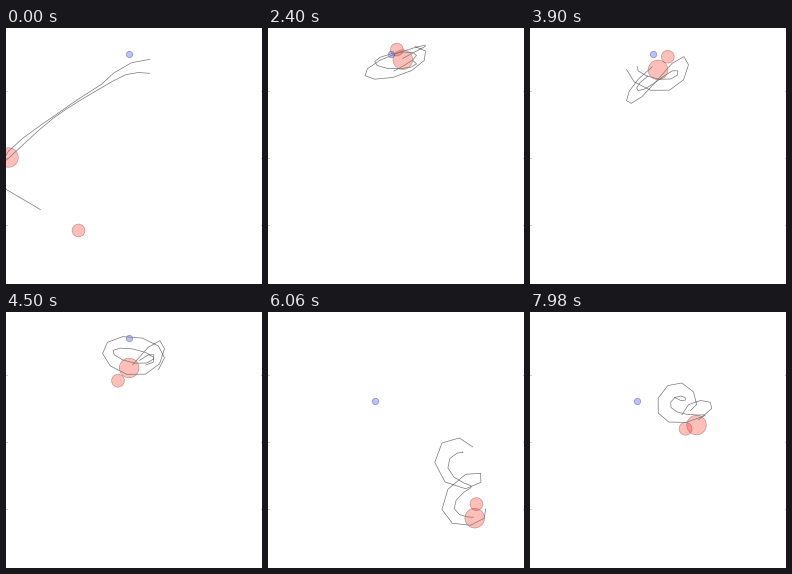
Recreate the animation shown at these times as a matplotlib script. Size 256 by 256 pixels, loop 8000 ms.

```python
import numpy as np
import matplotlib.pyplot as plt
from matplotlib.animation import FuncAnimation
from matplotlib.patches import Circle

SIZE, DPI = 256, 100
FRAMES, STEP = 200, 0.04          # seconds per frame
RESET = 4.89                      # new start and new goal
PLAN = 0.1 * np.arange(1, 16)     # look-ahead times of the planned path
GOALS = (123, 26), (107, 89)


def glide(t, times, values):
    """Smooth curve through key values that never overshoots them."""
    x, y = np.array(times, float), np.array(values, float)
    h, d = np.diff(x), np.diff(y) / np.diff(x)
    same = d[:-1] * d[1:] > 0
    total = np.where(same, d[:-1] + d[1:], 1)
    inner = np.where(same, 2 * d[:-1] * d[1:] / total, 0)
    m = np.concatenate([d[:1], inner, d[-1:]])
    i = np.clip(np.searchsorted(x, t, side="right") - 1, 0, len(h) - 1)
    u = np.clip((t - x[i]) / h[i], 0, 1)
    return ((1 + 2 * u) * (1 - u) ** 2 * y[i] + u * (1 - u) ** 2 * h[i] * m[i]
            + u * u * (3 - 2 * u) * y[i + 1]
            + u * u * (u - 1) * h[i] * m[i + 1])


class Swing:
    """Two bodies swinging about a drifting centre.

    x_turns and y_turns are the times at which each full swing completes.
    Each body has an x and y reach and a lead, in turns, on both axes.
    """

    def __init__(self, centre_x, centre_y, x_turns, y_turns, light, heavy):
        self.centre = centre_x, centre_y
        self.turns = x_turns, y_turns
        self.bodies = light, heavy

    def __call__(self, t):
        mid = [glide(t, *keys) for keys in self.centre]
        phase = [glide(t, k, range(len(k))) for k in self.turns]
        return np.array([
            mid[axis] + reach[axis] * np.cos(2 * np.pi * (phase[axis]
                                                          + lead[axis]))
            for reach, lead in self.bodies for axis in (0, 1)])


def launch(times, light_x, light_y, heavy_x, heavy_y, swing):
    """Run from a starting place into the swing, joined at the last time."""
    join = swing(np.array([times[-1]]))[:, 0]
    keys = [[*k, end] for k, end in
            zip((light_x, light_y, heavy_x, heavy_y), join)]

    def path(t):
        run = np.array([glide(t, times, k) for k in keys])
        return np.where(t < times[-1], run, swing(t))

    return path


hover = Swing(
    centre_x=((1, 7), (127, 127)),
    centre_y=((1.26, 2.42, 3.3, 3.9, 4.4, 5.1, 6.4),
              (54, 39, 29, 43, 55, 43, 46)),
    x_turns=(0.68, 1.68, 2.66, 3.67, 4.9, 5.9, 6.9),
    y_turns=(1.0, 2.0, 3.02, 4.38, 5.15, 6.15, 7.15),
    light=((31, 20), (0, 0)), heavy=((21, 8), (0.05, 0.1)))

climb = Swing(
    centre_x=((5.7, 6.65, 7.1, 7.6, 8.2, 8.8, 9.4),
              (197, 195, 190, 184, 169, 150, 144)),
    centre_y=((5.75, 6.1, 6.45, 7.05, 7.75, 8.4, 9.5),
              (236, 204, 195, 161, 127, 101, 81)),
    x_turns=(5.25, 6.2, 6.92, 7.62, 8.48, 9.37, 10.3),
    y_turns=(5.5, 6.42, 7.1, 7.75, 8.75, 9.5),
    light=((22, 17), (0, 0)), heavy=((10, 5), (0.13, 0.15)))

first = launch((0.02, 0.28, 0.45, 0.84, 1.26),
               (72, -8, -4, 54), (202, 151, 132, 83),
               (2, -10, -3, 49), (129, 139, 134, 88), hover)
second = launch((4.9, 5.1, 5.27, 5.5, 5.75),
                (100, 195, 219, 195), (78, 196, 233, 262),
                (200, 198, 200, 190), (285, 256, 263, 254), climb)

fig = plt.figure(figsize=(SIZE / DPI, SIZE / DPI), dpi=DPI, facecolor="white")
ax = fig.add_axes([0, 0, 1, 1])
ax.set_xlim(-0.5, SIZE - 0.5)
ax.set_ylim(SIZE - 0.5, -0.5)
ax.axis("off")

for y in (62, 129, 196):
    for x in (0, SIZE - 1):
        ax.plot([x - 0.5, x + 0.5], [y, y], color="0.55", lw=0.6,
                solid_capstyle="butt")


def disc(radius, face, edge):
    patch = Circle((0, 0), radius, facecolor=face, edgecolor=edge, lw=0.5)
    return ax.add_patch(patch)


RED, RED_EDGE = (1, 0.22, 0.15, 0.32), (0.45, 0.15, 0.12, 0.4)
heavy = disc(9.8, RED, RED_EDGE)
light = disc(6.4, RED, RED_EDGE)
goal = disc(3.2, (0.2, 0.25, 0.9, 0.32), (0.15, 0.15, 0.6, 0.45))
trails = [ax.plot([], [], color="0.47", lw=0.5, zorder=3)[0]
          for _ in range(2)]


def draw(frame):
    t = (frame + 0.5) * STEP
    path = first if t < RESET else second
    now, plan = path(np.array([t]))[:, 0], path(t + PLAN)
    light.center, heavy.center = now[:2], now[2:]
    goal.center = GOALS[int(t >= RESET)]
    trails[0].set_data(plan[0], plan[1])
    trails[1].set_data(plan[2], plan[3])
    return [heavy, light, goal, *trails]


anim = FuncAnimation(fig, draw, frames=FRAMES, interval=1000 * STEP,
                     repeat=True, repeat_delay=0, blit=False)
plt.show()
```
